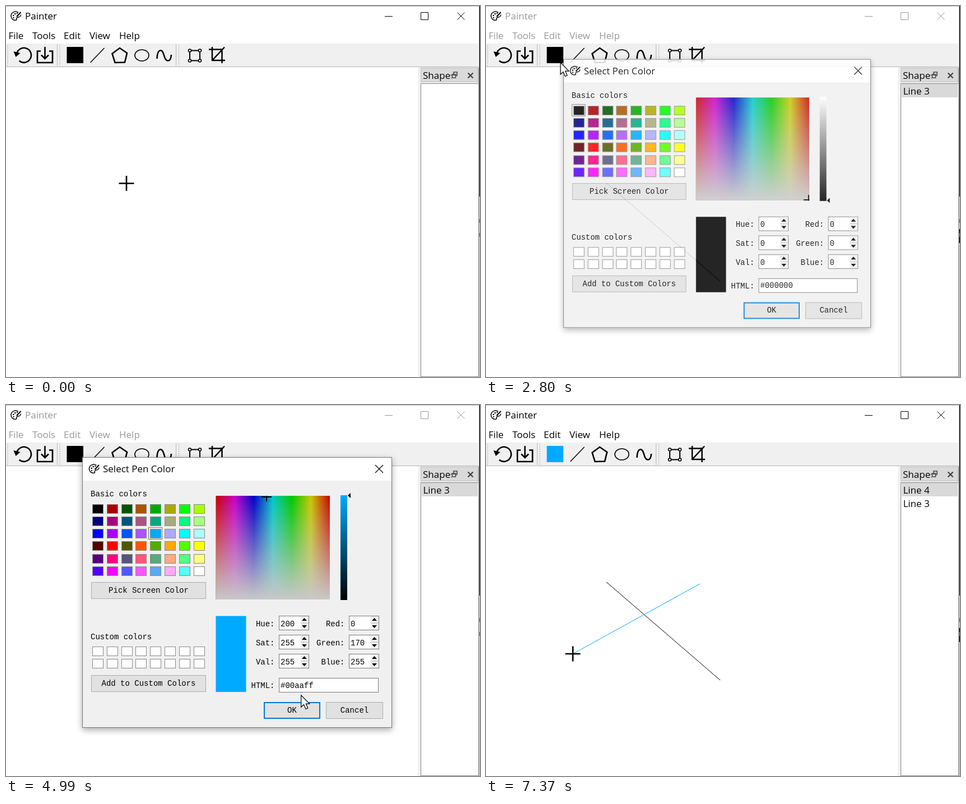
Recreate the animation shown at these times as an HTML page. Size 846 by 662 pixels, loop 8.01 s.

```html
<!DOCTYPE html>
<html lang="en">
<head>
<meta charset="utf-8">
<title>Painter</title>
<style>
html, body { margin: 0; width: 100%; height: 100%; overflow: hidden; background: #fff; }
svg { display: block; }
text { font: 17px "Open Sans", "Noto Sans", sans-serif; white-space: pre; }
.mono text { font: 14px "Liberation Mono", monospace; }
.mono text.ui { font: 17px "Open Sans", "Noto Sans", sans-serif; }
.ink { fill: none; stroke: #000; }
.crisp { shape-rendering: crispEdges; }
#chrome.inactive { fill: #999; stroke: #999; }
#chrome text { stroke: none; }
#chrome path { fill: none; }
#frame { filter: drop-shadow(0 4px 6px #0005); }
</style>
</head>
<body>
<svg id="stage" width="846" height="662" viewBox="0 0 846 662"></svg>
<script>
const LOOP = 8010, BLUE = '#00aaff';
const $ = id => document.getElementById(id);
const range = n => [...Array(n).keys()];
const set = (id, attrs) => { for (const k in attrs) $(id).setAttribute(k, attrs[k]); };
const show = (id, on) => set(id, { display: on ? 'inline' : 'none' });

// Markup helpers
const text = (x, y, s, more = '') => `<text x="${x}" y="${y}" ${more}>${s}</text>`;
const rect = (x, y, w, h, fill, more = '') =>
  `<rect x="${x}" y="${y}" width="${w}" height="${h}" fill="${fill}" ${more}/>`;
const box = (x, y, w, h, fill, stroke, more = '') =>
  rect(x + .5, y + .5, w - 1, h - 1, fill, `stroke="${stroke}" ${more}`);
const ink = (d, width, more = '') => `<path class="ink" d="${d}" stroke-width="${width}" ${more}/>`;
const button = (x, y, w, label, id = '') =>
  box(x, y, w, 30, '#e1e1e1', '#adadad', id && `id="${id}"`) +
  text(x + w / 2, y + 19, label, 'text-anchor="middle"');
const label = (x, y, s) => text(x, y, s, 'text-anchor="end"');
const handle = x => ink(`M${x} 70V107`, 1.5, 'stroke-dasharray="1.5 2.5" style="stroke:#aaa"');
const separator = x => rect(x, 68, 1, 39, '#b8b8b8');

function spin(x, y, name) {
  return label(x - 7.5, y + 18.5, name + ':') + box(x, y, 54, 26, '#fff', '#7a7a7a') +
    rect(x + 39, y + 1, 14, 24, '#f0f0f0') + rect(x + 39, y + 12.5, 14, 1, '#bbb') +
    `<path d="M${x + 41} ${y + 9}l4.5-5 4.5 5zm0 8l4.5 5 4.5-5z"/>` +
    text(x + 3, y + 18.5, '0', `id="${name}"`);
}

const palette = (x, y) => `<g transform="translate(${x} ${y})">` +
  ink('M14 2.5C9-1 1 2 1 9c0 5 4 7.5 8 7.5 4-.5 0-4 3-5s6 0 6.5-5', 1.5) +
  ink('M18.5 2L11 10', 2.2) + ink('M4 8h2.5M7 5h2.5M11 4h2M4.5 12h2', 2.2) + '</g>';

const toolbar = rect(0, 67, 843, 41, '#f0f0f0') + rect(0, 108, 843, 1, '#b4b4b4') +
  handle(3) + separator(91) + handle(96) + separator(303) + handle(308.5) +
  rect(104, 68, 40, 38, '#e5f1fb', 'id="hover"') + rect(108.5, 73, 29.5, 29, '#000', 'id="pen"') +
  ink('M19.4 84.4A13 13 0 1 1 23.6 97.8', 2.6) + '<path d="M13.5 81l4 10 8-7z"/>' +
  ink('M62 80.5H56V101H83V80.5H77M69.5 73V93M63 87.5l6.5 6.5 6.5-6.5', 2.6) +
  ink('M150.5 101L175.5 75', 1.5) + ink('M203 75L216 84 212 100.5 194.5 101 189.5 85Z', 2.6) +
  '<ellipse class="ink" cx="242.5" cy="88" rx="12.5" ry="10" stroke-width="1.7"/>' +
  ink('M269.5 94C270 76 279 75 282 88S294 101 295 87', 2.6) +
  ink('M331 79.5h12M331 97.5h12M328 82.5v12M346 82.5v12', 2) +
  [328, 346].map(x => [79.5, 97.5].map(y =>
    `<circle class="ink" cx="${x}" cy="${y}" r="2.5" stroke-width="1.6"/>`).join('')).join('') +
  ink('M368 73V97H391M362 77.5H385.5V102M390 73.5L368 97', 2.5);

const dock = rect(735, 109, 108, 553, '#f0f0f0') +
  box(740, 110, 103, 26, '#dadada', '#c2c2c2') + text(744, 130, 'Shapes') +
  rect(795, 118, 11, 12, '#dadada') +
  ink('M796.5 122h6v6h-6zM799 121v-3h6v6h-2M796 123h7', 1.6, 'style="stroke:#444"') +
  ink('M824.5 119.5l9 9m0-9l-9 9', 2.3, 'style="stroke:#444"') +
  box(740, 138, 104, 524, '#fff', '#828790') +
  rect(742, 139, 100, 24, '#d9d9d9', 'id="row"') +
  text(744.5, 157.5, '', 'id="first"') + text(744.5, 181.5, '', 'id="second"');

const desktop = rect(843, 109, 1.5, 553, '#9a9a9a') + rect(844, 0, 1, 662, '#999') +
  rect(845, 0, 1, 340, '#000') + rect(845, 340, 1, 322, '#e4e4e4') +
  rect(844.5, 380, 1.5, 7, '#777') + rect(844.5, 398, 1.5, 25, '#000', 'id="blip"') +
  rect(844.5, 405, 1.5, 7, '#777');

// Grid runs down columns: blue fastest, then red, then green
const swatch = (column, y, fill) =>
  box(Math.round(154 + 25.8 * column), Math.round(y), 20, 17, fill, '#8a8a8a');
const swatches = range(48).map(i => {
  const r = (i / 3 | 0) % 4 * 85, g = (i / 12 | 0) * 85, b = i % 3 * 255 >> 1;
  return swatch(i / 6 | 0, 177 + 22.15 * (i % 6), `rgb(${r},${g},${b})`);
}).join('') + range(16).map(i => swatch(i % 8, 431 + 22 * (i >> 3), '#fff')).join('');

const stops = range(7).map(i =>
  `<stop offset="${i / 6}" stop-color="hsl(${360 - i * 60} 100% 39.2%)"/>`).join('');

const dialog = `<g id="dialog" class="mono">
  ${rect(136, 93, 553, 483, '#f0f0f0', 'id="frame"')}${rect(136, 93, 553, 42, '#fff')}
  ${box(136, 93, 553, 483, 'none', '#777')}
  ${palette(147.5, 105)}${text(173, 120, 'Select Pen Color', 'class="ui"')}
  ${ink('M659 107l14 14m0-14l-14 14', 1.2, 'id="close"')}
  ${text(151, 163, 'Basic colors')}${swatches}
  ${box(0, 0, 25, 22, 'none', '#000', 'id="focus" stroke-dasharray="1 1"')}
  ${button(152, 316, 205, 'Pick Screen Color')}
  ${text(151, 417.5, 'Custom colors')}${button(152, 482, 205, 'Add to Custom Colors')}
  ${rect(374.5, 162, 203.5, 185, 'url(#hues)')}${rect(374.5, 162, 203.5, 185, 'url(#greys)')}
  ${ink('', 2, 'id="mark" clip-path="url(#field)"')}
  ${rect(597, 161, 12, 187, 'url(#values)')}
  <path id="slider" d="M610 0l5-4.5v9z"/>
  ${rect(374.5, 376.5, 54, 135.5, '#000', 'id="preview"')}
  ${['Hue', 'Sat', 'Val'].map((n, i) => spin(487, 376 + 34 * i, n)).join('')}
  ${['Red', 'Green', 'Blue'].map((n, i) => spin(612, 376 + 34 * i, n)).join('')}
  ${label(479.5, 505, 'HTML:')}${box(487, 487, 178, 26, '#fff', '#7a7a7a')}
  ${text(490, 504.5, '', 'id="hex"')}
  ${button(460, 530, 101, 'OK', 'ok')}${button(571, 530, 102, 'Cancel')}
</g>`;

$('stage').innerHTML = `<defs>
  <linearGradient id="hues">${stops}</linearGradient>
  <linearGradient id="greys" x2="0" y2="1"><stop stop-color="#c8c8c8" stop-opacity="0"/><stop offset="1" stop-color="#c8c8c8"/></linearGradient>
  <linearGradient id="values" x2="0" y2="1"><stop id="brightest"/><stop offset="1"/></linearGradient>
  <clipPath id="field">${rect(374.5, 162, 204, 185.5, '#000')}</clipPath>
</defs>
${rect(0, 0, 846, 662, '#fff')}${rect(0, 0, 845, 1, '#bbb')}
${palette(8, 9)}
<g id="chrome">
  ${text(34, 24, 'Painter')}${text(4.5, 59, 'File')}${text(47, 59, 'Tools')}
  ${text(103, 59, 'Edit')}${text(149, 59, 'View')}${text(202, 59, 'Help')}
  <path d="M676 18.5h14M740.5 11.5h13v13h-13zM805.5 11.5l13 13m0-13l-13 13"/>
</g>
${toolbar}${dock}${desktop}
${ink('', 1, 'id="line3" class="crisp"')}${ink('', 1, `id="line4" class="crisp" style="stroke:${BLUE}"`)}
${dialog}
${ink('M-13.5 0h27M0-13.5v27', 2.7, 'id="cross"')}
<path id="arrow" d="M0 0V21l4.8-4.5 3.5 8 3.7-1.6-3.4-7.8h6.4z" fill="#fff" stroke="#000" stroke-width="1.2"/>`;

// Pointer moves: start, end, number of jumps, destination
const moves = [
  [690, 990, 5, 418, 491], [1400, 1400, 1, 246, 237], [1480, 2040, 8, 133, 101],
  [2960, 3350, 6, 258, 211], [3660, 3890, 4, 262, 225], [4530, 4850, 5, 525, 514],
  [4990, 5220, 4, 532, 530], [5850, 6350, 7, 382, 319], [6740, 7140, 6, 155, 444]
];

function pointer(t) {
  let x = 215, y = 316.5;
  for (const [from, to, jumps, toX, toY] of moves) {
    if (t < from) break;
    const gap = (to - from) / (jumps - 1) || 1;
    const p = Math.min(1, (Math.floor((t - from) / gap + 1e-6) + 1) / jumps);
    x += (toX - x) * p;
    y += (toY - y) * p;
  }
  return [x, y];
}

// Opacity and scale of the dialog, held between screen updates
function dialogPose(t) {
  if (t < 5780) {
    const held = [2570, 2670, 2730, 2800, 2890].filter(k => k <= t).pop() || 0;
    const p = Math.max(0, Math.min(1, (held - 2640) / 250));
    return [Math.max(0, Math.min(1, (held - 2640) / 188)), 1 - .0555 * (1 - p) ** 2];
  }
  return t < 5850 ? [.5, .972] : t < 5920 ? [.1, .955] : [0, 1];
}

function drawLine(id, t, from, to, x0, y0) {
  show(id, t >= from);
  const [x, y] = pointer(Math.min(t, to));
  set(id, { d: `M${x0} ${y0}L${x} ${y}` });
}

function render(t) {
  const [x, y] = pointer(t);
  const picked = t >= 4360, accepted = t >= 5690;
  const modal = t >= 2570 && !accepted;
  const useArrow = y < 108 || modal;

  show('cross', !useArrow);
  show('arrow', useArrow);
  set(useArrow ? 'arrow' : 'cross', { transform: `translate(${x} ${y})` });
  drawLine('line3', t, 690, 990, 215, 316);
  drawLine('line4', t, 6740, 7140, 382, 319);

  set('chrome', { class: modal ? 'inactive' : '', stroke: modal ? '#999' : '#000' });
  set('pen', { fill: accepted ? BLUE : '#000' });
  show('hover', y < 108 && t < 2570);
  set('hover', { fill: t < 2340 ? '#e5f1fb' : '#cce4f7' });
  show('blip', t >= 130 && t < 4360 || t >= 5850);
  show('row', t >= 1150);
  $('first').textContent = t < 1150 ? '' : t < 7370 ? 'Line 3' : 'Line 4';
  $('second').textContent = t < 7370 ? '' : 'Line 3';

  const [alpha, scale] = dialogPose(t);
  show('dialog', alpha > 0);
  set('dialog', {
    opacity: alpha,
    transform: `translate(412.5 335) scale(${scale}) translate(-412.5 -335)`
  });
  show('close', !accepted);
  show('focus', t < 5450);
  set('focus', t < 4130 ? { x: 151.5, y: 174.5 } : { x: 254.5, y: 218.5 });
  set('preview', { fill: picked ? BLUE : '#000' });
  set('brightest', { 'stop-color': picked ? BLUE : '#fff' });
  set('slider', { transform: `translate(0 ${picked ? 161.5 : 347})` });
  set('mark', { d: picked ? 'M456 164h18M465 154v18' : 'M568 346h20M577 337v20' });
  const values = picked ? [200, 255, 255, 0, 170, 255] : Array(6).fill(0);
  ['Hue', 'Sat', 'Val', 'Red', 'Green', 'Blue'].forEach((n, i) => $(n).textContent = values[i]);
  $('hex').textContent = picked ? BLUE : '#000000';

  const over = t >= 5060, pressed = t >= 5450, border = over ? 1 : 2;
  set('ok', {
    fill: pressed ? '#cce4f7' : over ? '#e5f1fb' : '#e1e1e1',
    stroke: pressed ? '#005499' : '#0078d7',
    'stroke-width': border,
    x: 460 + border / 2, y: 530 + border / 2, width: 101 - border, height: 30 - border
  });
}

const start = performance.now();
(function tick() {
  render((performance.now() - start) % LOOP);
  requestAnimationFrame(tick);
})();
</script>
</body>
</html>
```
